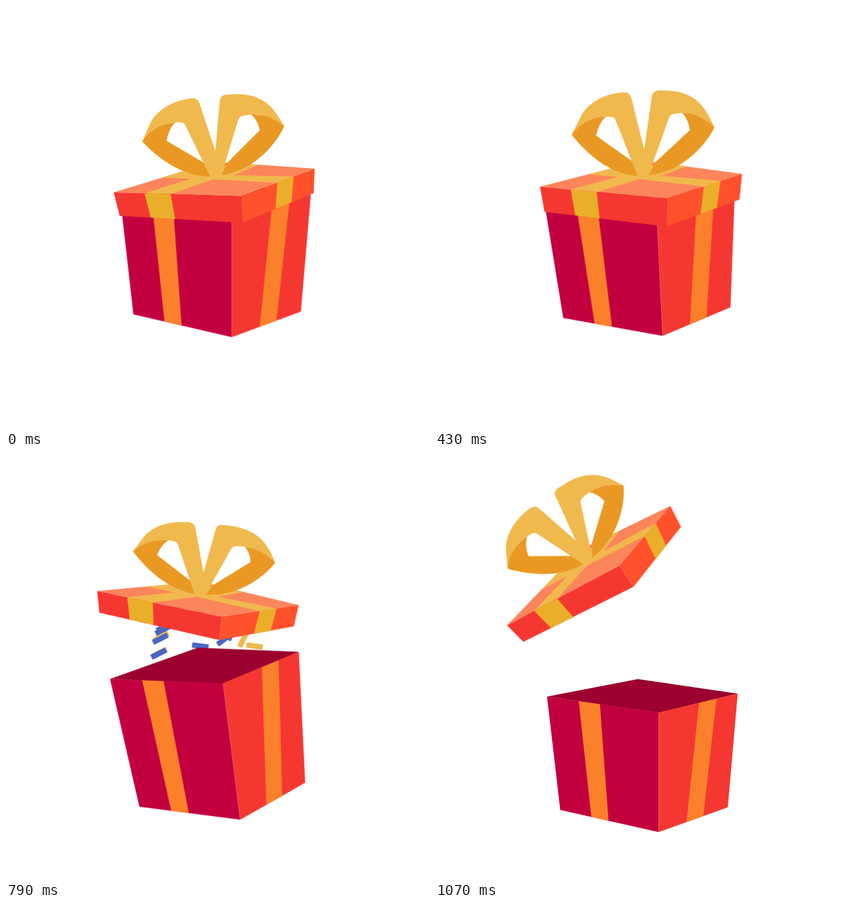
Recreate the animation shown at these times as an HTML page. Size 640x640 px, loop 1.21 s.

```html
<!DOCTYPE html>
<html lang="en">
<head>
<meta charset="utf-8">
<title>Gift box</title>
<style>
  html, body { margin: 0; width: 100%; height: 100%; overflow: hidden; background: #fff; }
  svg { display: block; width: 100vw; height: 100vh; }
  .crimson { fill: #c2003f; }
  .inside { fill: #9b002e; }
  .red { fill: #f43831; }
  .orange { fill: #fb802b; }
  .scarlet { fill: #ff512c; }
  .salmon { fill: #fc855b; }
  .band { fill: #eaaf2a; }
  .gold { fill: #f0b94e; }
  .amber { fill: #e99923; }
  .blue { fill: #4b66c3; }

  /* Two held pictures between neighbouring poses */
  #box, #lid, #confetti rect { animation: 1210ms steps(2) infinite; }
  #box { animation-name: box; transform-origin: 316.25px 532px; }
  #lid { animation-name: lid; transform-origin: 316px 262px; }
  #confetti rect { animation-name: scatter; }

  @keyframes box {
    0% { transform: translate(3.2px, -67.6px) rotate(0deg) scaleY(1.03); }
    11.57%, 35.53%, 41.32% { transform: translate(4.3px, -68px) rotate(-2.75deg) scaleY(1.018); }
    23.14% { transform: translate(-5.6px, -69.3px) rotate(3.9deg) scaleY(.978); }
    52.89% { transform: translate(-5.2px, -73.3px) rotate(3.9deg) scaleY(.926); }
    64.46% { transform: translate(11px, -21px) rotate(-7.15deg) scaleY(1.15); }
    76.85%, 100% { transform: translate(0px, 0px) rotate(0deg) scaleY(1); }
  }
  @keyframes lid {
    0% { transform: translate(0px, 0px) rotate(0deg) scaleY(1); }
    11.57%, 35.53%, 41.32% { transform: translate(-3.1px, -.4px) rotate(3.5deg) scaleY(1.055); }
    23.14% { transform: translate(2.6px, -6.1px) rotate(1.9deg) scaleY(.955); }
    52.89% { transform: translate(1.9px, -2.3px) rotate(-3deg) scaleY(1.025); }
    64.46% { transform: translate(-24.4px, -50.1px) rotate(10deg) scaleY(.89); }
    76.85% { transform: translate(-84.6px, -102.5px) rotate(-29.7deg) scaleY(.9); }
    88.42%, 100% { transform: translate(-83.6px, -99.8px) rotate(-29.7deg) scaleY(.96); }
  }
  @keyframes scatter {
    0%, 64.45%, 88.42%, 100% { opacity: 0; }
    64.46%, 88.41% { opacity: 1; }
    0%, 64.46% { transform: translate(var(--start)) rotate(var(--turn)); }
    76.85% { transform: translate(var(--end)) rotate(var(--turn)); }
    88.42%, 100% { transform: translate(var(--far)) rotate(var(--turn)); }
  }
</style>
</head>
<body>
<svg viewBox="0 0 640 640">
  <g id="confetti"></g>

  <g id="box">
    <path class="inside" d="M169.5 362.5L307 336L458 358L338.5 387Z"/>
    <path class="crimson" d="M169.5 362.5L338.5 386.5V567.5L189.5 534Z"/>
    <path class="red" d="M338.5 386.5L458 358L443 530L338.5 567.5Z"/>
    <path class="orange" d="M217.5 369.5L249.5 374L262.5 550.5L236.5 544.6Z"/>
    <path class="orange" d="M399.5 372L426 365.7L406 543.3L380.5 552.5Z"/>
  </g>

  <g id="lid">
    <path class="salmon" d="M163 282L315 235.5L467 246L355.5 288Z"/>
    <path class="gold" d="M209.5 283.4L277 262L343 237.5L382 240.2L345 255.8L313 262.3L249 284.7Z"/>
    <path class="gold" d="M235 260L268 250L345 255.8L435 258L410.5 267.5L313 262.3Z"/>
    <path class="red" d="M163 282L355.5 288L358 328L172 317.5Z"/>
    <path class="scarlet" d="M355.5 288L467 246L465.5 283L358 328Z"/>
    <path class="band" d="M209.5 283.4L249 284.7L256 322.3L219 320.2Z"/>
    <path class="band" d="M410.5 267.3L435 258L432 297L408 307.1Z"/>

    <path class="amber" d="M206 205C215 190 232 178 256 176Q246 186 243 204L299 237L320 257L312 258C268 259 232 232 206 205Z"/>
    <path class="amber" d="M421 182C412 172 395 163 371 164Q381 173 384 188L335 237L326 256C370 250 405 216 421 182Z"/>
    <path class="gold" d="M206 205C213 190 216 182 220 174C234 152 258 142 283 139.5Q291 140 293 148L327 250L322 258H309L271.5 181Q270 176.5 265 176C240 175 219 186 206 205Z"/>
    <path class="gold" d="M323.5 143Q324 135 333 134C352 132 374 133 390 144C401 151 409 161 421 182C400 165 380 161 359 166Q353 167 351.5 172L326 255L313 257L317 217Z"/>
  </g>
</svg>
<script>
  const confetti = document.getElementById('confetti');
  const mix = (a, b, k) => a.map((v, i) => v + (b[i] - v) * k);
  const px = point => point.map(v => `${v.toFixed(1)}px`).join(', ');

  function addChip(colour, start, end, turn) {
    const chip = document.createElementNS('http://www.w3.org/2000/svg', 'rect');
    const attrs = { x: -12.5, y: -4, width: 25, height: 8, class: colour };
    for (const name in attrs) chip.setAttribute(name, attrs[name]);
    chip.style.setProperty('--start', px(start));
    chip.style.setProperty('--end', px(end));
    chip.style.setProperty('--far', px(mix(start, end, 1.26)));
    chip.style.setProperty('--turn', `${turn}deg`);
    confetti.append(chip);
  }

  // Left fan: parallel chips that end along a parabola
  const centre = [300, 290];
  for (const colour of ['gold', 'blue']) {
    for (let i = 0; i < 4; i++) {
      const y = colour === 'gold' ? 118 + 99 * i : 158 + 18 * i * i;
      const end = [25 + .0014 * (y - 310) ** 2, y];
      addChip(colour, mix(centre, end, .25), end, -27);
    }
  }

  // Right fan: three crossing pairs
  const turns = { gold: [-40, -63, 8], blue: [-63, -37, 8] };
  for (let i = 0; i < 3; i++) {
    const middle = [482 + 59 * i - 6 * i * i, 57 + 74 * i - 25 * i * i];
    for (const colour of ['gold', 'blue']) {
      const gold = colour === 'gold';
      const side = gold ? 1 : -1;
      const start = [342 + (gold ? 17 * i : -12 * i * i), 266 + 10 * i];
      const end = [middle[0] + side * 7 * (i - 1), middle[1] + side * 5 * (-1) ** i];
      addChip(colour, start, end, turns[colour][i]);
    }
  }
</script>
</body>
</html>
```
